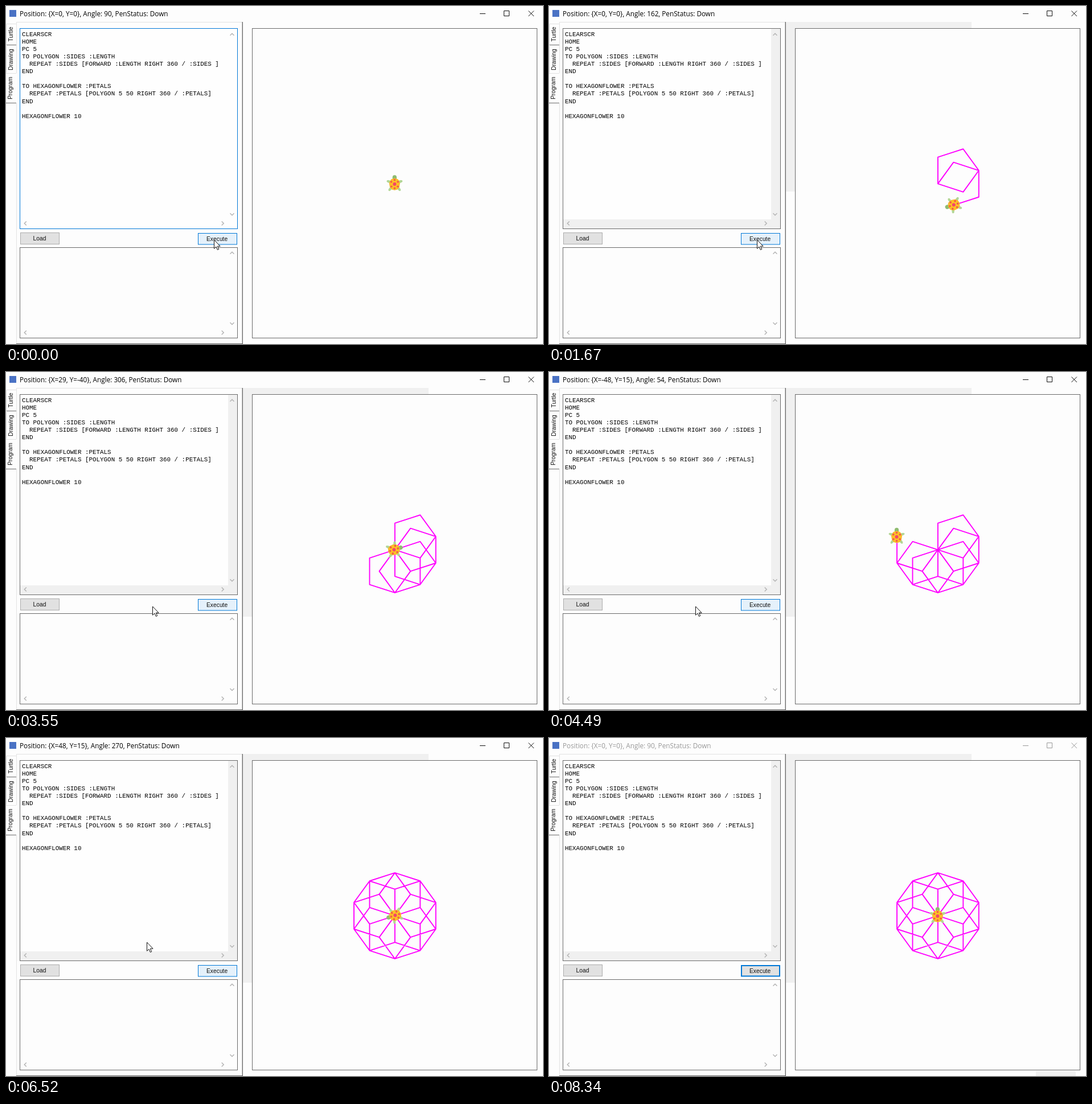
Recreate the animation shown at these times as an HTML page. Size 943 by 594 pixels, loop 8430 ms.

```html
<!DOCTYPE html>
<html lang="en">
<head>
<meta charset="utf-8">
<title>Turtle program</title>
<style>
  html, body { margin: 0; width: 100%; height: 100%; overflow: hidden; background: #fdfdfd; }
  svg { display: block; width: 943px; height: 594px; }
  text { white-space: pre; }
  .ui { font: 10.3px "Liberation Sans", Arial, sans-serif; fill: #111; }
  .code { font: 10.88px "Liberation Mono", "Courier New", monospace; fill: #000; }
  .caption { font: 11.76px "Open Sans", "Noto Sans", sans-serif; }
  .line { fill: none; stroke: #6a6a6a; }
  .chevron { fill: none; stroke: #b4b4b4; stroke-width: 1.5; }
</style>
</head>
<body>
<svg viewBox="0 0 943 594">
  <rect width="943" height="594" fill="#fdfdfd"/>
  <rect x="6" y="7" width="12" height="12" fill="#4a72c4"/>
  <text id="title" class="caption" x="24" y="18"></text>
  <path id="controls" fill="none" d="M832 13.5h10M874.5 8.5h9v9h-9zM917.5 8.5l9.5 9.5m0-9.5l-9.5 9.5"/>

  <rect id="margin" x="416" y="28" width="326" fill="#f0f0f0"/>
  <rect id="corner" x="855" y="585" width="70" height="9" fill="#f0f0f0"/>

  <!-- tabs and page -->
  <path class="line" style="stroke:#e2e2e2" d="M1 31.5H18M0.5 32V68M0.5 70V117M0 118.5H18M18.5 28V118M18.5 171V594M18 28.5H415"/>
  <path class="line" d="M1 68.5H18M0 170.5H18M18 593.5H415"/>
  <path class="line" stroke-width="1.4" d="M415.3 28V594"/>
  <g class="ui">
    <text transform="translate(12 62.5) rotate(-90)">Turtle</text>
    <text transform="translate(12 113) rotate(-90)">Drawing</text>
    <text transform="translate(10.5 164) rotate(-90)">Program</text>
  </g>

  <rect x="25" y="40" width="381" height="351" fill="#fefefe"/>
  <path id="bars" fill="#f0f0f0" d="M390 40h16v351H25v-16h365z"/>
  <rect id="editor" class="line" x="24.5" y="39.5" width="382" height="352"/>
  <rect class="line" x="24.5" y="424.5" width="382" height="159"/>
  <g id="chevrons" class="chevron"></g>
  <g id="code" class="code"></g>

  <rect x="25.5" y="398.5" width="68" height="20" fill="#e1e1e1" stroke="#adadad"/>
  <text class="ui" x="47.5" y="412">Load</text>
  <rect x="337" y="399" width="69" height="20.5" fill="#0078d7"/>
  <rect id="execute"/>
  <text class="ui" x="352" y="413">Execute</text>

  <rect x="432.5" y="39.5" width="500" height="544" fill="#fdfdfd" stroke="#6a6a6a"/>
  <polyline id="trail" fill="none" stroke="#f0f" stroke-width="1.9" stroke-linejoin="round"/>
  <g id="turtle">
    <g fill="#b2d695">
      <ellipse cx="-10" cy="-3.5" rx="4" ry="2.2" transform="rotate(15 -10 -3.5)"/>
      <ellipse cx="10" cy="-3.5" rx="4" ry="2.2" transform="rotate(-15 10 -3.5)"/>
      <ellipse cx="-7.5" cy="9.3" rx="2.3" ry="4.4" transform="rotate(38 -7.5 9.3)"/>
      <ellipse cx="7.5" cy="9.3" rx="2.3" ry="4.4" transform="rotate(-38 7.5 9.3)"/>
      <ellipse cy="-10.5" rx="3.7" ry="4.3" fill="#8fbc70"/>
    </g>
    <path d="M0 -9L6 -7 9 -1 8 6 5 10 0 11.3 -5 10 -8 6 -9 -1 -6 -7Z" fill="#fcc224" stroke="#f8b02e" stroke-linejoin="round"/>
    <g id="spots" fill="#f4564f"><circle cy="1" r="3" fill="#f2466b"/></g>
  </g>
  <path id="cursor" d="M0 0V15.3L3.5 12.1 5.9 17.5 8.2 16.5 5.9 11.2H10.6Z" fill="#fff" stroke="#111"/>
</svg>
<script>
const LOOP = 8430, PETALS = 10, SIDES = 5, LENGTH = 50, SCALE = 0.934;
const $ = id => document.getElementById(id);
const set = (id, attrs) => { for (const k in attrs) $(id).setAttribute(k, attrs[k]); };
const show = (id, on) => set(id, { visibility: on ? "visible" : "hidden" });

$("code").innerHTML = `CLEARSCR
HOME
PC 5
TO POLYGON :SIDES :LENGTH
  REPEAT :SIDES [FORWARD :LENGTH RIGHT 360 / :SIDES ]
END

TO HEXAGONFLOWER :PETALS
  REPEAT :PETALS [POLYGON 5 50 RIGHT 360 / :PETALS]
END

HEXAGONFLOWER 10`.split("\n")
  .map((s, i) => `<text x="28" y="${52.7 + i * 13.09}">${s}</text>`).join("");

const chevron = (x, y, turn) =>
  `<path d="M-3.5 1.8L0 -1.7 3.5 1.8" transform="translate(${x} ${y}) rotate(${turn})"/>`;
$("chevrons").innerHTML = [[50, 366, 382], [434, 558, 574]].map(([up, down, side]) =>
  chevron(397, up, 0) + chevron(397, down, 180) +
  chevron(34, side, -90) + chevron(380.5, side, 90)).join("");

for (const [x, y] of [[-5.8, -3], [5.8, -3], [-5.6, 5.2], [5.6, 5.2], [0, -6.2], [0, 8.2]])
  $("spots").innerHTML += `<circle cx="${x}" cy="${y}" r="1.8"/>`;

// Run the program: one state per FORWARD, plus the home heading at the end
const states = [{ x: 0, y: 0, angle: 90 }];
for (let p = 0; p < PETALS; p++)
  for (let s = 0; s < SIDES; s++) {
    const { x, y } = states[states.length - 1];
    const angle = (90 - p * 36 - s * 72 + 1080) % 360, a = angle * Math.PI / 180;
    states.push({ x: x + LENGTH * Math.cos(a), y: y + LENGTH * Math.sin(a), angle });
  }
states.push({ x: 0, y: 0, angle: 90 });

// Piecewise linear value through [time, value] keys
function along(keys, t) {
  if (t <= keys[0][0]) return keys[0][1];
  for (let i = 1; i < keys.length; i++) {
    const [t0, v0] = keys[i - 1], [t1, v1] = keys[i];
    if (t < t1) return v0 + (v1 - v0) * (t - t0) / (t1 - t0);
  }
  return keys[keys.length - 1][1];
}
const stepAt = (keys, t) => Math.floor(along(keys, t) + 0.01);

const moves = [[578, 0], [700, 1], [1670, 9], [3550, 25], [4490, 33], [5940, 45], [6520, 50], [6750, 51]];
// The caption lags behind the turtle and catches up at the end
const labels = [[1060, 0], [1180, 1], [1670, 5], [3550, 21], [4490, 29], [5940, 41], [6520, 49], [6640, 50], [6750, 51]];
const mouseX = [[2130, 365], [2350, 257], [6000, 257], [6250, 247], [6980, 247], [7720, 895]];
const mouseY = [[2130, 411], [2350, 412], [6000, 412], [6250, 359], [6980, 359], [7720, 596]];

const px = s => 682.9 + s.x * SCALE;
const py = s => 312.4 - s.y * SCALE;
const whole = v => Math.round(v) || 0;

function draw(t) {
  const n = stepAt(moves, t), at = states[n], label = states[stepAt(labels, t)];
  $("title").textContent =
    `Position: {X=${whole(label.x)}, Y=${whole(label.y)}}, Angle: ${label.angle}, PenStatus: Down`;
  set("title", { fill: t < 8340 ? "#000" : "#999" });
  set("controls", { stroke: t < 8340 ? "#111" : "#999" });

  set("trail", { points: states.slice(0, n + 1).map(s => px(s) + "," + py(s)).join(" ") });
  set("turtle", { transform: `translate(${px(at) - 0.5} ${py(at) - 0.4}) rotate(${90 - at.angle})` });

  $("editor").style.stroke = t < 400 ? "#0078d7" : "#6a6a6a";
  show("bars", t >= 400);
  show("margin", t >= 700);
  set("margin", { height: t < 2150 ? 298 : 402 });
  show("corner", t >= 7720);

  // The button's face shrinks as its blue frame thickens
  const hot = t < 6990, edge = hot ? 1 : 2;
  set("execute", {
    x: 337 + edge, y: 399 + edge, width: 69 - 2 * edge, height: 20.5 - 2 * edge,
    fill: hot ? "#e5f1fb" : "#e1e1e1"
  });

  show("cursor", t < 7720);
  set("cursor", { transform: `translate(${along(mouseX, t) + 0.5} ${along(mouseY, t)})` });
}

const start = performance.now();
function frame() {
  draw((performance.now() - start) % LOOP);
  requestAnimationFrame(frame);
}
frame();
</script>
</body>
</html>
```
